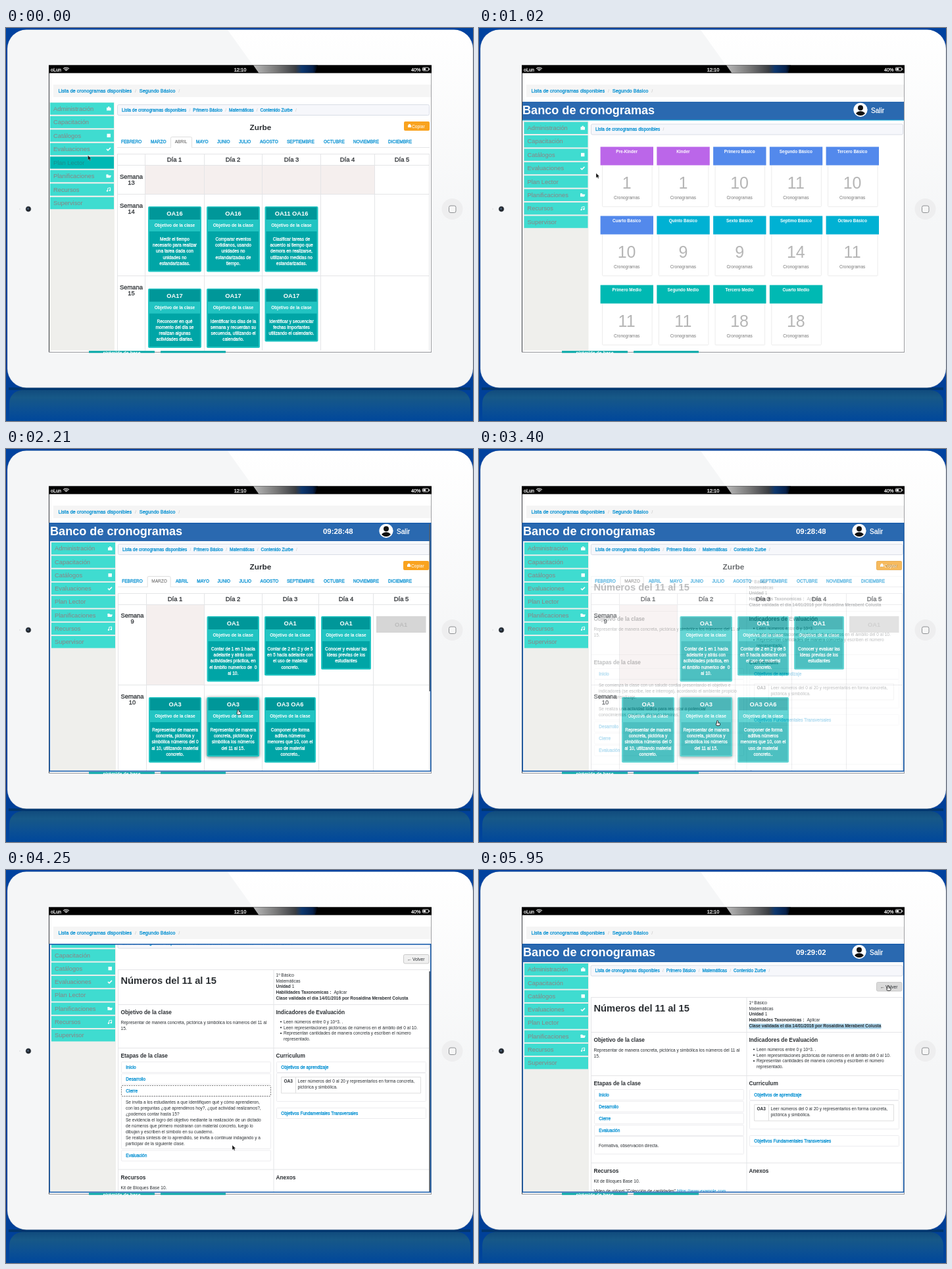
Animation of 710x597 px, one loop 6.12 s. Source, as an HTML page with a canvas:

```html
<!DOCTYPE html>
<html lang="es">
<head>
<meta charset="utf-8">
<title>Banco de cronogramas</title>
<style>
html,body{margin:0;width:100%;height:100%;overflow:hidden;background:#00409a}
canvas{display:block;width:710px;height:597px}
</style>
</head>
<body>
<canvas id="stage" width="710" height="597"></canvas>
<script>
const W = 710, H = 597, STEP = 170, STEPS = 36;
const main = document.getElementById('stage').getContext('2d');
const layer = document.createElement('canvas');
layer.width = W; layer.height = H;
const over = layer.getContext('2d');
let c = main;

const FONT = '"Liberation Sans", Arial, sans-serif';
const LINK = '#0590d2', INK = '#2b2f33', TEAL = '#3fdcd0', LINE = '#e4e5e7', BLUE = '#2a69b0';
const COURSE = 'Zurbe';

function rect(x, y, w, h, fill) { c.fillStyle = fill; c.fillRect(x, y, w, h); }

function round(x, y, w, h, r, fill, stroke) {
  c.beginPath();
  c.roundRect(x, y, w, h, r);
  if (fill) { c.fillStyle = fill; c.fill(); }
  if (stroke) { c.strokeStyle = stroke; c.lineWidth = 1; c.stroke(); }
}

function disc(x, y, r, fill) {
  c.beginPath(); c.arc(x, y, r, 0, 7); c.fillStyle = fill; c.fill();
}

function poly(points, fill) {
  c.beginPath();
  points.forEach(([x, y]) => c.lineTo(x, y));
  c.closePath(); c.fillStyle = fill; c.fill();
}

// weight: 0 regular, 1 bold, 2 medium
function text(s, x, y, size, color, weight = 0, align = 'left') {
  c.font = (weight === 1 ? 'bold ' : '') + size + 'px ' + FONT;
  c.textAlign = align;
  c.fillStyle = color;
  c.fillText(s, x, y);
  if (weight === 2) { c.strokeStyle = color; c.lineWidth = .28; c.strokeText(s, x, y); }
  return c.measureText(s).width;
}

function lines(list, x, y, size, color, gap, weight, align) {
  list.forEach((s, i) => text(s, x, y + i * gap, size, color, weight, align));
}

function gradient(y0, y1, stops) {
  const g = c.createLinearGradient(0, y0, 0, y1);
  stops.forEach(([p, col]) => g.addColorStop(p, col));
  return g;
}

function crumbs(parts, x, y, size, weight) {
  parts.forEach(s => {
    x += text(s, x, y, size, LINK, weight) + size * .65;
    x += text('/', x, y, size, '#c4c4c4') + size * .6;
  });
}

function tablet() {
  rect(0, 0, W, H, gradient(0, H, [[0, '#00429f'], [.9, '#003f98'], [1, '#00459c']]));
  rect(4, 546, 702, 4, '#01366f');
  round(5, 550, 701, 60, 20, gradient(549, H, [[0, '#104a7c'], [.25, '#175887'], [.6, '#0d5192'], [1, '#00479b']]));
  round(2, 2.5, 708, 544, 29, '#e3e6ea');
  round(3, 3, 706, 542.5, 28, '#f5f6f7');
  c.save();
  c.beginPath(); c.roundRect(3, 3, 706, 542.5, 28); c.clip();
  poly([[337, 3], [710, 3], [710, 300], [550, 300]], gradient(3, 300, [[0, '#fff'], [1, '#f5f6f7']]));
  c.restore();
  disc(34, 275, 4.4, '#9ba1a8');
  disc(34, 275, 3.7, '#20252c');
  disc(33.5, 274.5, 1.5, '#4a6078');
  disc(21, 275, 1, '#e2e3e5');
  disc(678.5, 275, 16, '#eeeeef');
  round(673.5, 270, 10.5, 10.5, 2.5, '#f6f6f6', '#8d8f92');
}

function statusBar() {
  rect(65, 56.5, 582, 436, '#3c3f44');
  rect(66, 68, 580.5, 424, '#fff');
  rect(65, 56.5, 582, 12, '#000');
  const g = c.createLinearGradient(378, 0, 474, 0);
  [[0, '#b5b5b5'], [.35, '#777'], [.65, '#3a3d42'], [.75, '#0d376e'], [.92, '#06204a'], [1, '#000']]
    .forEach(([p, col]) => g.addColorStop(p, col));
  poly([[376, 56.5], [474, 56.5], [470, 68], [384, 68]], g);
  text('oLun', 68, 65.5, 7.2, '#e8e8e8', 2);
  text('12:10', 356, 65.5, 7.4, '#f0f0f0', 2, 'center');
  text('40%', 616, 65.5, 7.2, '#e8e8e8', 2);
  round(633.5, 60, 9, 5, 1, null, '#ddd');
  rect(634.5, 61, 3.5, 3, '#eee');
  rect(643, 61.5, 1.2, 2, '#ddd');
  c.strokeStyle = '#eee'; c.lineWidth = 1.1;
  [2, 4, 6].forEach(r => {
    c.beginPath(); c.arc(91.5, 66, r, -Math.PI * .76, -Math.PI * .24); c.stroke();
  });
  rect(72, 86, 574, 19, '#f5f5f5');
  crumbs(['Lista de cronogramas disponibles', 'Segundo Básico'], 79.5, 98, 7.5, 2);
  rect(126, 490.5, 100, 3, '#00a5a5');
  rect(235, 490.5, 99, 3, '#00a5a5');
  c.save();
  c.beginPath(); c.rect(126, 490, 100, 5); c.clip();
  text('pirámide de base', 176, 495.5, 7, '#fff', 1, 'center');
  c.restore();
}

const MENU = [['Administración', 'case'], ['Capacitación'], ['Catálogos', 'book'], ['Evaluaciones', 'check'],
  ['Plan Lector'], ['Planificaciones', 'folder'], ['Recursos', 'note'], ['Supervisor']];

function icon(kind, x, y) {
  const w = '#fff';
  if (kind === 'case') { rect(x - 3, y - 1.5, 6.5, 4.5, w); rect(x - 1, y - 3, 2.5, 1.5, w); }
  if (kind === 'book') rect(x - 2.5, y - 2.7, 5.4, 5.4, w);
  if (kind === 'folder') {
    rect(x - 3.5, y - 2.5, 3, 2, w);
    poly([[x - 3.5, y - 1.5], [x + 4, y - 1], [x + 2.5, y + 2.5], [x - 3.5, y + 2.5]], w);
  }
  c.strokeStyle = w;
  if (kind === 'check') {
    c.lineWidth = 1.5;
    c.beginPath(); c.moveTo(x - 3, y); c.lineTo(x - 1, y + 2); c.lineTo(x + 3, y - 2); c.stroke();
  }
  if (kind === 'note') {
    c.lineWidth = .9;
    c.beginPath(); c.moveTo(x - 1.3, y + 2); c.lineTo(x - 1.3, y - 2); c.lineTo(x + 2.6, y - 2.8); c.lineTo(x + 2.6, y + 1.2); c.stroke();
    disc(x - 2, y + 2, 1.2, w); disc(x + 1.8, y + 1.2, 1.2, w);
  }
}

function sidebar(x, y, pitch, hover = -1, open = false) {
  rect(x - 1, 113, 99, 377, '#efefec');
  MENU.forEach(([name, kind], i) => {
    rect(x, y, 97, 18.3, i === hover ? '#00b8b4' : TEAL);
    text(name, x + 5, y + 12.2, 9.35, i === hover ? '#1d8c8c' : '#8c8283');
    if (kind) icon(kind, x + 89, y + 9);
    if (open && i === 2) {
      c.setLineDash([2, 1.5]);
      round(x + .5, y + .5, 96, 17.3, 0, null, '#3d7f7e');
      c.setLineDash([]);
      ['Banco de pruebas', 'Plan Lector', 'Ver Cronogramas'].forEach((s, j) => {
        const top = y + 19 + j * 20.7;
        rect(x, top, 97, 20, j ? '#effdfd' : '#a6fdfd');
        text(s, x + 92, top + 12.5, 6.7, LINK, 2, 'right');
      });
      y += 61.6;
    }
    y += pitch;
  });
}

function header(dx, clock) {
  rect(66, 112, 580, 28, BLUE);
  text('Banco de cronogramas', 66 + dx, 131, 18.1, '#fff', 1);
  if (clock) text(clock, 482, 129, 11.4, '#fff', 1);
  const x = 580 - dx * 2;
  disc(x, 124.3, 10.6, '#fff');
  disc(x, 121.3, 4, '#111');
  c.save();
  c.beginPath(); c.arc(x, 124.3, 8.8, 0, 7); c.clip();
  c.beginPath(); c.ellipse(x, 132, 7.5, 5.8, 0, 0, 7); c.fillStyle = '#111'; c.fill();
  c.restore();
  text('Salir', x + 16, 128.6, 10, '#fff', 2);
}

function card(x, y, w, title, body, hover) {
  const h = 53 + body.length * 9.3, m = x + w / 2;
  if (hover) { c.shadowColor = '#0008'; c.shadowBlur = 5; c.shadowOffsetY = 1; }
  round(x, y, w, h, 2, '#22c4c2');
  c.shadowColor = 'transparent'; c.shadowBlur = 0; c.shadowOffsetY = 0;
  rect(x + 2, y + 1.5, w - 4, 18.5, '#009799');
  rect(x + 2, y + 38, w - 4, h - 40, '#00a5a6');
  text(title, m, y + 14.3, 9.3, '#fff', 1, 'center');
  text('Objetivo de la clase', m, y + 31, 6.6, '#fff', 1, 'center');
  lines(body, m, y + 52, 6.6, '#fff', 9.2, 2, 'center');
}

function grid(xs, ys) {
  xs.forEach(x => rect(x, ys[0], 1, 490 - ys[0], LINE));
  ys.forEach(y => rect(xs[0], y, xs[xs.length - 1] - xs[0], 1, LINE));
}

const MONTHS = [['FEBRERO', 175], ['MARZO', 220], ['ABRIL', 256.7], ['MAYO', 289], ['JUNIO', 321], ['JULIO', 354],
  ['AGOSTO', 386], ['SEPTIEMBRE', 427], ['OCTUBRE', 483], ['NOVIEMBRE', 528], ['DICIEMBRE', 581]];
const PATH = ['Lista de cronogramas disponibles', 'Primero Básico', 'Matemáticas', 'Contenido ' + COURSE];

function crumbBox(x, y, parts) {
  round(x + .5, y + .5, 474, 16, 2, '#f6f7fb', '#d9dde6');
  crumbs(parts, x + 7, y + 10.6, 6.6, 2);
}

function planHead(dx, dy, active) {
  crumbBox(169 + dx, 116 + dy, PATH);
  text(COURSE, 387, 154.5 + dy, 11.8, INK, 1, 'center');
  round(605 - dx, 142 + dy, 39, 14, 2, '#f9a31f');
  rect(611 - dx, 147.5 + dy, 5, 3.5, '#fff');
  rect(612.2 - dx, 146 + dy, 2.6, 2, '#fff');
  text('Copiar', 617 - dx, 151.6 + dy, 6.7, '#fff');
  rect(169 + dx, 181 + dy, 475, 1, LINE);
  MONTHS.forEach(([m, x], i) => {
    x += i < 4 ? dx * 1.3 : i < 7 ? dx * .6 : 0;
    if (i === active) {
      const w = i === 1 ? 35 : 32;
      round(x - 6.2, 165.5 + dy, w, 17, 2, '#fff', '#dedede');
      rect(x - 5.7, 181 + dy, w - 1, 2, '#fff');
    }
    text(m, x, 175.3 + dy, 6.5, i === active ? '#555' : LINK, i === active ? 0 : 2);
  });
}

function days(centers, y) {
  centers.forEach((x, i) => text('Día ' + (i + 1), x, y, 9.5, INK, 2, 'center'));
}

function week(n, x, y) {
  text('Semana', x, y, 9.4, INK, 2, 'center');
  text(n, x, y + 9, 9.4, INK, 2, 'center');
}

function april(k, mouse) {
  const open = k >= 3;
  const hover = open ? -1 : Math.floor((mouse[1] + 4 - 113.4) / 20.5);
  sidebar(67, 113.4, 20.5, hover, open);
  planHead(0, 0, 2);
  rect(212, 209, 348, 43, '#f5efee');
  grid([169, 211, 301, 389, 478, 560, 643], [191, 208, 252, 376]);
  days([256, 345, 434, 519, 602], 202.5);
  week(13, 190.5, 229); week(14, 190.5, 273); week(15, 190.5, 397);
  card(216, 271, 81, 'OA16', ['Medir el tiempo', 'necesario para realizar', 'una tarea dada con', 'unidades no', 'estandarizadas.']);
  card(305, 271, 81, 'OA16', ['Comparar eventos', 'cotidianos, usando', 'unidades no', 'estandarizadas de', 'tiempo.']);
  card(393.5, 271, 81, 'OA11 OA16', ['Clasificar tareas de', 'acuerdo al tiempo que', 'demora en realizarse,', 'utilizando medidas no', 'estandarizadas.']);
  card(216, 395.7, 81, 'OA17', ['Reconocer en qué', 'momento del día se', 'realizan algunas', 'actividades diarias.']);
  card(305, 395.7, 81, 'OA17', ['Identificar los días de la', 'semana y recuerdan su', 'secuencia, utilizando el', 'calendario.']);
  card(393.5, 395.7, 81, 'OA17', ['Identificar y secuenciar', 'fechas importantes', 'utilizando el calendario.']);
}

const LEVELS = ['Pre-Kinder', 'Kinder', 'Primero Básico', 'Segundo Básico', 'Tercero Básico', 'Cuarto Básico', 'Quinto Básico',
  'Sexto Básico', 'Septimo Básico', 'Octavo Básico', 'Primero Medio', 'Segundo Medio', 'Tercero Medio', 'Cuarto Medio'];
const COUNTS = [1, 1, 10, 11, 10, 10, 9, 9, 14, 11, 11, 11, 18, 18];

function bank() {
  sidebar(68.5, 142.7, 20.4);
  header(0);
  rect(66, 139.5, 580, 1, '#18b5dc');
  crumbBox(170, 145.5, PATH.slice(0, 1));
  LEVELS.forEach((name, i) => {
    const x = 184.6 + i % 5 * 85.75, y = 181 + Math.floor(i / 5) * 105, m = x + 40;
    const fill = i < 2 ? '#bb66e9' : i < 6 ? '#5389ec' : i < 10 ? '#00b1d3' : '#00b9b3';
    round(x + 3, y + 20.5, 75.5, 70, 1, '#fff', '#ececec');
    rect(x, y - .5, 80.4, 28, fill);
    text(name, m, y + 9, 6.4, '#fff', 1, 'center');
    text(COUNTS[i], m, y + 62.5, 25, '#b6b6b6', 0, 'center');
    text('Cronogramas', m, y + 79.3, 6.5, '#777', 0, 'center');
  });
}

function frameLine() {
  c.strokeStyle = '#1b5fae'; c.lineWidth = 1.6;
  c.strokeRect(66.3, 112.8, 579.4, 376.6);
}

function march(k) {
  sidebar(69, 142, 20.3);
  header(1, '09:28:48');
  planHead(1, 28, 1);
  rect(214, 237, 87, 121, '#f5efee');
  grid([170, 213, 301, 389, 475, 558, 643], [219, 236, 358]);
  days([257, 345, 432, 517, 601], 230.5);
  week(9, 192, 256); week(10, 192, 379);
  card(305.5, 254, 79.5, 'OA1', ['Contar de 1 en 1 hacia', 'adelante y atrás con', 'actividades práctica, en', 'el ámbito numerico de  0', 'al 10.']);
  card(393, 254, 78, 'OA1', ['Contar de 2 en 2 y de 5', 'en 5 hacia adelante con', 'el uso de material', 'concreto.']);
  card(479, 254, 76, 'OA1', ['Conocer y evaluar las', 'ideas previas de los', 'estudiantes']);
  rect(563, 254, 75.5, 25, '#d6d6d6');
  text('OA1', 600.5, 269.5, 9.3, '#bcbcbc', 1, 'center');
  card(217, 377, 80, 'OA3', ['Representar de manera', 'concreta, pictórica y', 'simbólica números del 0', 'al 10, utilizando material', 'concreto.']);
  card(305.5, 377, 79.5, 'OA3', ['Representar de manera', 'concreta, pictórica y', 'simbólica los números', 'del 11 al 15.'], k > 11);
  card(393, 377, 78, 'OA3 OA6', ['Componer de forma', 'aditiva números', 'menores que 10, con el', 'uso de material', 'concreto..']);
  if (k < 18) rect(643.5, 113, 2, 255, '#555b62');
  frameLine();
}

const STAGES = ['Inicio', 'Desarrollo', 'Cierre', 'Evaluación'];
const PANELS = {
  0: ['Se comienza la clase con un saludo cordial presentando el objetivo e',
    'indicadores (se escribe, lee e interroga), acordando el ambiente propicio',
    'para el aprendizaje.', '',
    'Se realiza una actividad lúdica para rescatar o potenciar',
    'conocimientos previos, utilizando láminas.'],
  2: ['Se invita a los estudiantes a que identifiquen qué y cómo aprendieron,',
    'con las preguntas ¿qué aprendimos hoy?, ¿qué actividad realizamos?,', '¿podemos contar hasta 15?',
    'Se evidencia el logro del objetivo mediante la realización de un dictado',
    'de números que primero mostraran con material concreto, luego lo',
    'dibujan y escriben el símbolo en su cuaderno.',
    'Se realiza síntesis de lo aprendido, se invita a continuar indagando y a',
    'participar de la siguiente clase.'],
  3: ['', 'Formativa, observación directa.']
};

function boxed(s, x, y, dashed) {
  if (dashed) c.setLineDash([2, 1.5]);
  round(x + .5, y + .5, 227, 16, 1, '#fff', dashed ? '#777' : '#ececef');
  c.setLineDash([]);
  text(s, x + 7.3, y + 10.8, 6.55, LINK, 2);
}

function lesson(k, mouse) {
  const scroll = k >= 23 && k < 29 ? 42 : 0;
  const open = k < 24 ? 0 : k < 28 ? 2 : 3;
  c.save();
  c.beginPath(); c.rect(66, 112, 580, 378); c.clip();
  rect(66, 112, 580, 378, '#fff');
  sidebar(69, 142 - scroll, 20.3);
  c.translate(0, -scroll);
  const secs = 49 + Math.round((k - 20) * 13 / 15);
  header(1, '09:' + (28 + Math.floor(secs / 60)) + ':' + String(secs % 60).padStart(2, '0'));
  crumbBox(169.5, 144.5, PATH);
  round(604.5, 170.5, 38.5, 13.5, 2, k > 33 ? '#dadada' : '#f0f0f0', '#c9c9c9');
  text('←', 610, 179.7, 7, '#222', 1);
  text('Volver', 618, 179.6, 6.6, INK);

  text('Números del 11 al 15', 174.5, 215, 14.7, INK, 1);
  const R = 410.5, S = 6.55;
  text('1º Básico', R, 203.5, S, INK);
  text('Matemáticas', R, 212.5, S, INK);
  text('1', R + 2 + text('Unidad', R, 221.3, S, INK, 1), 221.3, S, INK);
  text('Aplicar', R + 4 + text('Habilidades Taxonomicas :', R, 230.3, S, INK, 1), 230.3, S, INK);
  const note = 'Clase validada el día 14/01/2016 por Rosaldina Merabent Colusta';
  if (k > 30) {
    c.font = 'bold ' + S + 'px ' + FONT;
    rect(R, 233.5, c.measureText(note).width * Math.min(1, (k - 30) / 2), 8, '#a9d3ea');
  }
  text(note, R, 239.4, S, INK, 1);

  const head = (s, x, y) => text(s, x, y, 8.3, INK, 1);
  head('Objetivo de la clase', 174.5, 261);
  lines(['Representar de manera concreta, pictórica y simbólica los números del 11 al', '15.'], 174.5, 275.7, S, INK, 9);
  head('Indicadores de Evaluación', R, 261);
  lines(['Leen números entre 0 y 10^3. .', 'Leen representaciones pictóricas de números en el ámbito del 0 al 10.',
    'Representan cantidades de manera concreta y escriben el número', 'representado.'], 422, 274.7, S, INK, 8.8);
  for (let i = 0; i < 3; i++) disc(418, 272.5 + i * 8.8, 1.1, INK);

  head('Etapas de la clase', 174.5, 327);
  let y = 333;
  STAGES.forEach((s, i) => {
    boxed(s, 175, y, i === open && i === 2);
    y += 18;
    if (i !== open) return;
    const body = PANELS[i], h = body.length * 9 + 8.5 + (i === 3 ? 2 : 0);
    round(175.5, y - .5, 227, h - 1.5, 1, null, '#ececef');
    lines(body, 182, y + 9.8 - (i === 3 ? 2.5 : 0), S, INK, 9);
    y += h;
  });

  head('Curriculum', R, 327);
  boxed('Objetivos de aprendizaje', 411, 333);
  round(411.5, 350.5, 227, 43, 1, null, '#ececef');
  round(418.5, 356.5, 212, 24.5, 0, null, '#dedede');
  rect(440, 356, 1, 25, '#dedede');
  text('OA3', 422.5, 365.3, S, INK, 1);
  lines(['Leer números del 0 al 20 y representarlos en forma concreta,', 'pictórica y simbólica.'], 443.5, 365.3, S, INK, 9);
  boxed('Objetivos Fundamentales Transversales', 411, 403);

  const end = y + 11;
  [193, 246, 312, end].forEach(v => rect(170, v, 474, 1, LINE));
  [170, 406.5, 643].forEach(x => rect(x, 193, 1, 360, LINE));
  head('Recursos', 174.5, end + 15);
  head('Anexos', R, end + 15);
  text('Kit de Bloques Base 10.', 174.5, end + 30, S, INK);
  const w = text('Video de vidorel "Colección de cantidades" ', 174.5, end + 45, S, INK);
  text('https://www.example.com', 174.5 + w, end + 45, S, LINK);
  c.restore();
  if (scroll) rect(643.3, 154, 2, 336, '#555b62');
  frameLine();
}

// step, x, y, hand
const MOVES = [[0, 124.5, 193.5], [2, 118, 160], [3, 120, 164], [4, 131, 190.5], [5, 137, 221], [6, 178, 220.5], [8, 385, 212, 1], [9, 396, 195, 1],
  [13, 353, 397, 1], [20, 362.5, 414, 1], [22, 260, 350], [24, 200, 336, 1], [25, 344, 418], [28, 198, 395, 1],
  [30, 411, 237], [32, 606, 238], [34, 622, 177, 1], [36, 622, 177, 1]];

function pointer(k) {
  const i = MOVES.findIndex((m, n) => k >= m[0] && k < MOVES[n + 1][0]);
  const a = MOVES[i], b = MOVES[i + 1], p = (k - a[0]) / (b[0] - a[0]);
  return [a[1] + (b[1] - a[1]) * p, a[2] + (b[2] - a[2]) * p, a[3]];
}

function drawPointer([x, y, hand]) {
  c.lineWidth = .8;
  if (hand) {
    round(x - 2, y + 2, 6, 4.2, 1.5, '#fff', '#222');
    round(x - 1, y - 1.5, 2, 5, 1, '#fff', '#222');
    rect(x - .6, y + 1, 1.4, 3, '#fff');
    return;
  }
  const arrow = [[0, 0], [0, 7.2], [1.8, 5.7], [3, 8.2], [4.2, 7.6], [3, 5.2], [5.2, 5]].map(([a, b]) => [x + a, y + b]);
  poly(arrow, '#111');
  c.strokeStyle = '#fff9'; c.lineWidth = .5; c.stroke();
}

function draw(k) {
  const mouse = pointer(k);
  const fade = k < 20 ? 0 : k === 20 ? .3 : k === 21 ? .8 : 1;
  c = main;
  c.clearRect(0, 0, W, H);
  tablet();
  statusBar();
  c.save();
  c.beginPath(); c.rect(65, 111, 582, 380); c.clip();
  if (k < 6) april(k, mouse);
  else if (k < 10) bank();
  else if (fade < 1) march(k);
  if (fade) {
    c = over;
    c.clearRect(0, 0, W, H);
    lesson(k, mouse);
    c = main;
    c.globalAlpha = fade;
    c.drawImage(layer, 0, 0);
    c.globalAlpha = 1;
  }
  c.restore();
  drawPointer(mouse);
}

let last = -1;
const start = performance.now();
function tick() {
  const k = Math.floor((performance.now() - start) / STEP) % STEPS;
  if (k !== last) draw(last = k);
  requestAnimationFrame(tick);
}
tick();
</script>
</body>
</html>
```
